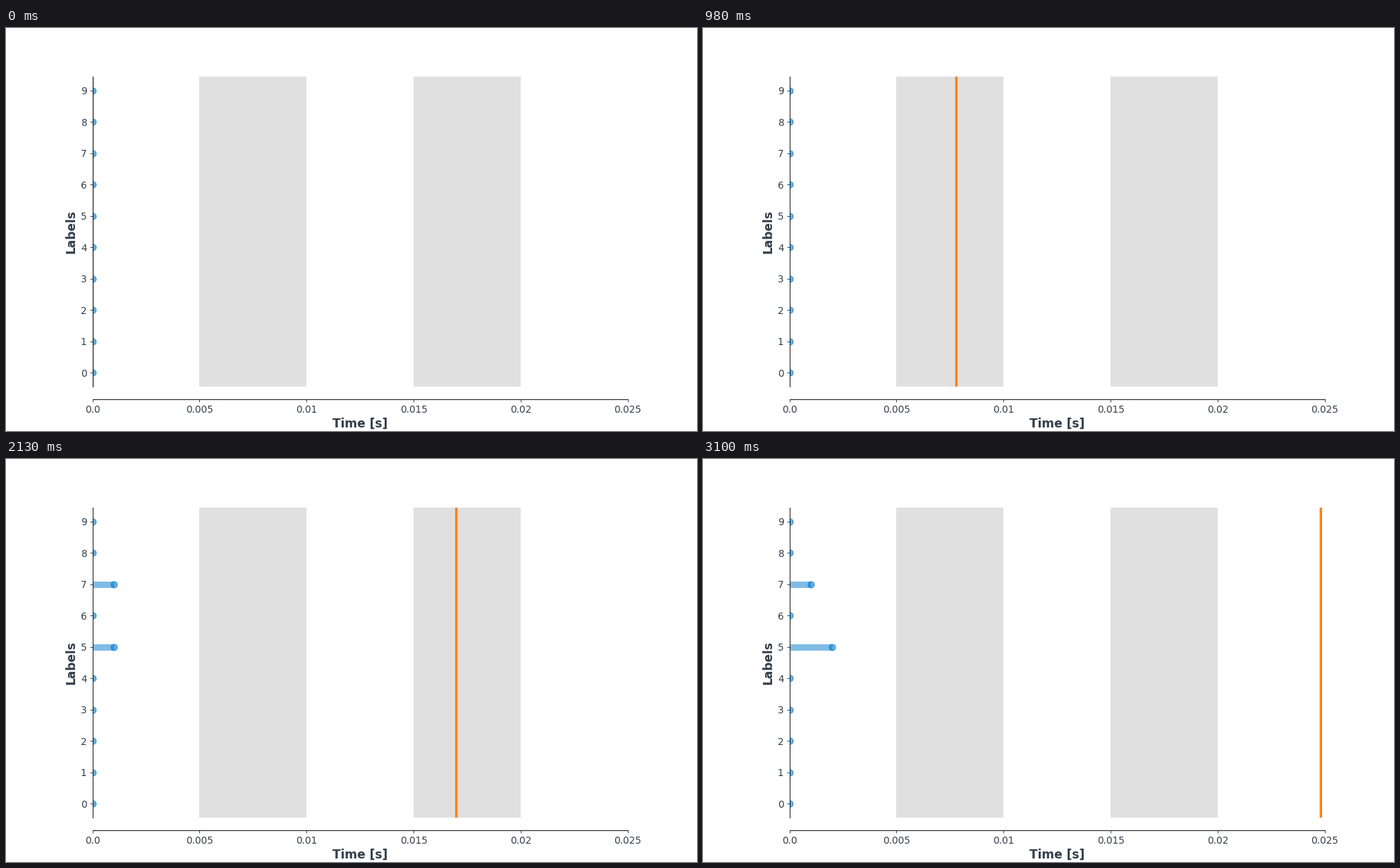
A matplotlib script that plays this animation: 980 px wide and 572 px high, repeating every 3.12 s.

```python
import matplotlib.pyplot as plt
from matplotlib.animation import FuncAnimation

W, H, DPI = 980, 572, 64
LOOP, TICK = 3120, 10            # ms
T_END, DT, STEP_MS = 0.025, 0.0002, 25
SPIKES = {5: (64, 118), 7: (70,)}  # label -> steps at which its count grows
LABELS = range(10)

BLUE, SLATE, ORANGE, BAND = "#007acc", "#333F4B", "#ff7f0e", "#e0e0e0"


def pt(size):
    """Scale point sizes meant for a 12 inch wide figure."""
    return size * W / (12 * DPI)


plt.rcParams.update({
    "font.family": "DejaVu Sans",
    "font.size": pt(12),
    "axes.linewidth": pt(0.8),
    "axes.labelpad": pt(4),
    "axes.edgecolor": "black",
})
for axis in "xtick", "ytick":
    plt.rcParams.update({
        f"{axis}.color": SLATE,
        f"{axis}.labelsize": pt(12),
        f"{axis}.major.size": pt(3.5),
        f"{axis}.major.width": pt(0.8),
        f"{axis}.major.pad": pt(3.5),
    })

fig = plt.figure(figsize=(W / DPI, H / DPI), dpi=DPI, facecolor="white")
ax = fig.add_axes([0.125, 0.11, 0.775, 0.77])
ax.set_xlim(0, T_END)
ax.set_ylim(-0.45, 9.45)

for side in "top", "right":
    ax.spines[side].set_visible(False)
ax.spines["bottom"].set_position(("axes", -0.04))

ticks = [0.0, 0.005, 0.01, 0.015, 0.02, 0.025]
ax.set_xticks(ticks, [str(t) for t in ticks])
ax.set_yticks(LABELS)
label_style = dict(fontsize=pt(15), fontweight="bold", color=SLATE)
ax.set_xlabel("Time [s]", **label_style)
ax.set_ylabel("Labels", **label_style)

for start in 0.005, 0.015:
    ax.axvspan(start, start + 0.005, facecolor=BAND, linewidth=0, zorder=0)

cursor = ax.axvline(0, color=ORANGE, lw=pt(3), snap=False)
bars = ax.hlines(LABELS, 0, [0] * 10, color=BLUE, alpha=0.5, lw=pt(8), zorder=2)
dots, = ax.plot([0] * 10, LABELS, "o", color=BLUE, alpha=0.6,
                markersize=pt(8), markeredgewidth=pt(1))


def snap_time(t, columns=930):
    """Round a time to the nearest column of the plot's sweep grid."""
    return round(t / T_END * columns) / columns * T_END


def update(frame):
    step = frame * TICK // STEP_MS
    x = snap_time(step * DT)
    cursor.set_xdata([x, x])
    counts = [sum(step >= s for s in SPIKES.get(k, ())) * 0.001 for k in LABELS]
    bars.set_segments([[(0, k), (c, k)] for k, c in zip(LABELS, counts)])
    dots.set_xdata(counts)
    return cursor, bars, dots


anim = FuncAnimation(fig, update, frames=LOOP // TICK, interval=TICK,
                     repeat=True, repeat_delay=0, blit=False)
plt.show()
```
